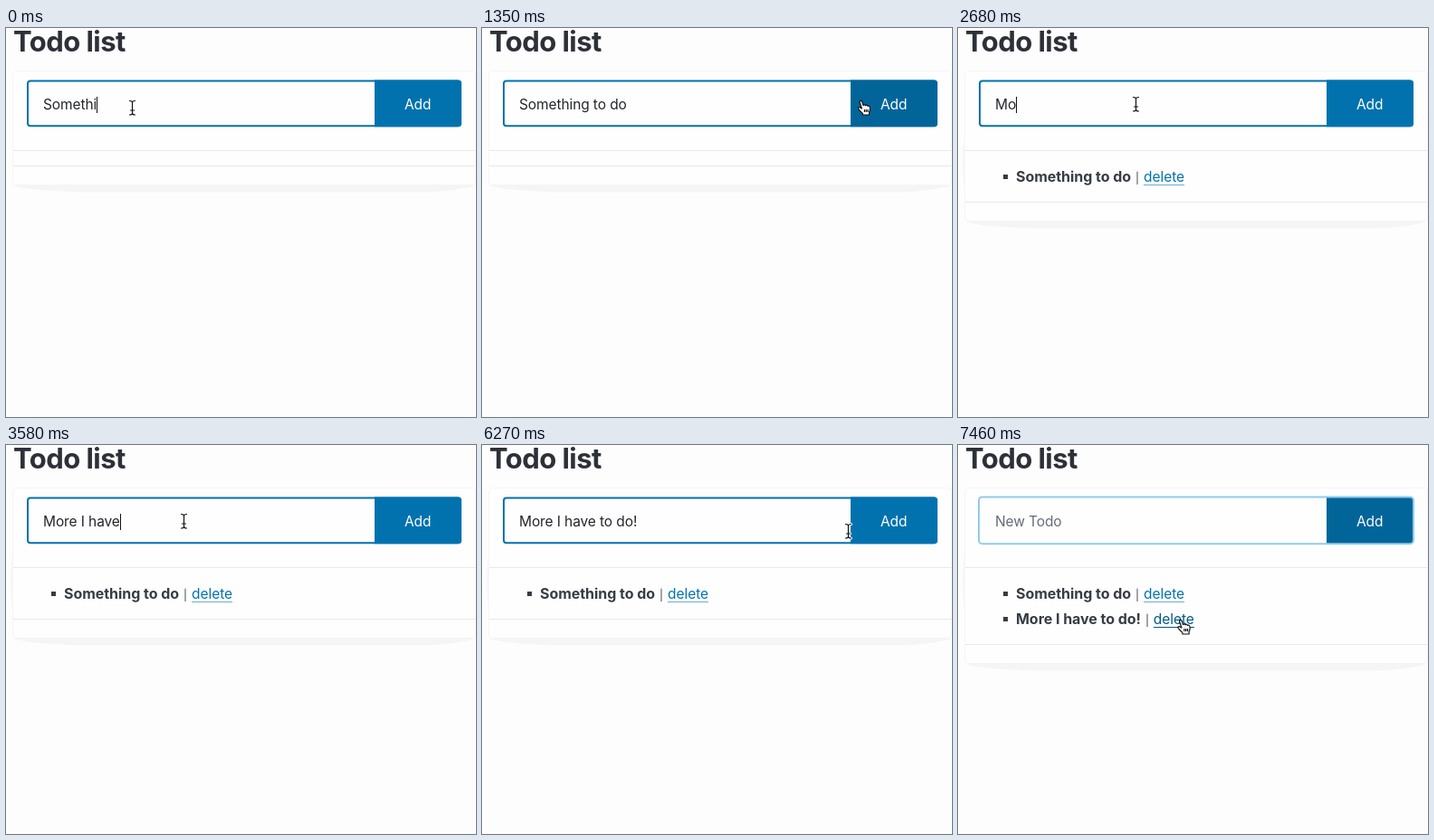
Write an HTML page that moves like this. It is 519 px wide and 430 px high and loops after 8000 ms.

```html
<!DOCTYPE html>
<html lang="en">
<head>
<meta charset="utf-8">
<title>Todo list</title>
<style>
  html, body { margin: 0; width: 100%; height: 100%; overflow: hidden; background: #fdfdfd; }
  body { position: relative; font: 15.5px/28px Inter, sans-serif; letter-spacing: -.1px; color: #373c44; }
  body * { position: absolute; box-sizing: border-box; }
  h1 { margin: 0; left: 8px; top: -3px; font: 700 31px/36px Inter, sans-serif; letter-spacing: -.55px; color: #2d3038; white-space: pre; }
  .card { left: 7px; top: 47px; width: 512px; border: 1px solid #f5f5f7; border-radius: 5px; background: #fefefe; }
  .rule { left: 8px; width: 510px; height: 1px; background: #e8e9ec; }
  svg { left: 0; top: 0; width: 519px; height: 430px; overflow: hidden; }

  .field { fill: #fefefe; stroke: #0172ad; stroke-width: 2; }
  .button { fill: #0172ad; }
  .glow { fill: none; stroke: #92cbea; stroke-width: 2; display: none; }
  .dark .button { fill: #02659a; }
  .ring .field { stroke: #fefefe; }
  .ring .glow { display: inline; }
  .line { left: 41px; top: 70.5px; height: 28px; display: flex; align-items: center; white-space: pre; color: #23262c; }
  .line * { position: static; }
  .caret { width: 1px; height: 18px; background: #111; }
  .hint { left: 41px; top: 70.5px; color: #646b79; white-space: pre; }
  .add { left: 440px; top: 70.5px; color: #fff; }

  .item { left: 64px; font-size: 16px; letter-spacing: -.04px; white-space: pre; }
  .item * { position: static; }
  .item::before { content: ""; position: absolute; left: -14px; top: 12px; width: 5px; height: 5px; background: #373c44; }
  i { font-size: 12px; font-style: normal; padding: 0 .5px; }
  u { font-size: 15.5px; color: #0172ad; text-decoration: underline 1px #6daccd; text-underline-offset: 3px; }
  u.over { color: #015887; text-decoration-color: #015887; }
</style>
</head>
<body>
<svg>
  <path id="side" fill="#f7f7fa" d="M8 120Q5 128 5 150T8 182Z"/>
  <path id="shade" fill="#f5f5f8" d="M8 0H518Q505 5 466 7.5H80Q20 5 8 0Z"/>
</svg>
<div class="card" id="card"></div>
<h1>Todo list</h1>
<svg>
  <g id="form">
    <rect class="field" x="24" y="58.4" width="478" height="49.9" rx="3"/>
    <path class="button" d="M407 57.4H499Q503 57.4 503 61.4V105.3Q503 109.3 499 109.3H407Z"/>
    <rect class="glow" x="23" y="57.4" width="480" height="51.9" rx="4"/>
  </g>
</svg>
<div class="hint" id="hint">New Todo</div>
<div class="line"><span id="value"></span><span class="caret" id="caret"></span></div>
<div class="add">Add</div>
<div class="rule" style="top:135px"></div>
<div class="rule" id="rule"></div>
<div class="item" style="top:150px"><b>Something to do</b> <i>|</i> <u>delete</u></div>
<div class="item" style="top:178px"><b>More I have to do!</b> <i>|</i> <u id="link">delete</u></div>
<svg>
  <defs>
    <path id="stem" d="M-3-8Q0-8 0-6Q0-8 3-8M0-6V5.5M-3 7.5Q0 7.5 0 5.5Q0 7.5 3 7.5M-2 2.5H2"/>
  </defs>
  <g id="beam" fill="none" stroke-linecap="round">
    <use href="#stem" stroke="#fff" stroke-width="3"/>
    <use href="#stem" stroke="#111" stroke-width="1.2"/>
  </g>
  <path id="hand" fill="#fff" stroke="#111" stroke-width="1.2" stroke-linejoin="round"
    d="M-2.6 1L-4.9-6C-5.2-7.8-3-8.2-2.4-6.6L-1-2.4C-.4-3.6 1.2-3.4 1.6-2.2C2.2-3.2 3.8-2.8 4-1.6C4.8-2.4 6.2-1.8 6.4-.4Q7.2 2.6 5.6 5.2V8H-1.6V6.4Q-4 4.4-6.2 1.6C-7.2 0-5.4-1-4.4 0ZM.4 2V5M2.2 2V5M4 2V5"/>
  <path id="arrow" fill="#111" stroke="#fff" d="M0 0V14L3.2 11 5.3 16 7.4 15 5.3 10.3H10Z"/>
</svg>
<script>
const LOOP = 8000;

const typing = [
  [0, "Somethi"], [150, "Somethin"], [300, "Something "], [450, "Something t"],
  [600, "Something to "], [750, "Something to do"], [1650, ""],
  [2680, "Mo"], [2830, "Mor"], [2980, "More "], [3130, "More I"], [3280, "More I "],
  [3430, "More I ha"], [3580, "More I have"], [3730, "More I have t"],
  [3880, "More I have to "], [4180, "More I have to do"], [4630, "More I have to do!"],
  [6720, ""]
];

const pointer = [
  [0, "beam", 139.5, 88.5], [1050, "beam", 205, 88], [1200, "beam", 345, 88],
  [1350, "hand", 422, 88], [1500, "hand", 434, 88], [1800, "beam", 335, 89],
  [1940, "beam", 222.5, 87.5], [2080, "beam", 197.5, 84.5], [2230, "beam", 196.5, 84.5],
  [5680, "beam", 206, 85], [5830, "beam", 255, 89], [5970, "beam", 325, 93],
  [6120, "beam", 380, 95], [6270, "beam", 404.5, 95.5], [6420, "hand", 425, 101],
  [6570, "hand", 434, 104], [6870, "hand", 424, 104], [7020, "arrow", 365, 140],
  [7170, "arrow", 300, 178], [7310, "hand", 256, 198], [7460, "hand", 249.5, 201]
];

const $ = id => document.getElementById(id);
const items = document.querySelectorAll(".item");
const latest = (steps, t) => steps.findLast(step => step[0] <= t);
const within = (t, ...spans) => spans.some(([from, to]) => t >= from && t < to);
const show = (el, on) => el.style.display = on ? "" : "none";

function draw(t) {
  const text = latest(typing, t)[1];
  $("value").textContent = text;
  show($("hint"), !text);
  show($("caret"), within(t, [0, 1050], [2080, 5080], [5530, 5970]));

  $("form").classList.toggle("dark", within(t, [1350, 2080], [6420, LOOP]));
  $("form").classList.toggle("ring", within(t, [1650, 2080], [6720, LOOP]));

  const count = (t >= 1650) + (t >= 6720);
  const listEnd = [152, 192, 220][count];
  items.forEach((item, i) => show(item, i < count));
  $("rule").style.top = listEnd + "px";
  $("card").style.height = listEnd - 25 + "px";
  $("shade").setAttribute("transform", `translate(0 ${listEnd + 22})`);
  show($("side"), count);
  $("link").classList.toggle("over", t >= 7310);

  const [, shape, x, y] = latest(pointer, t);
  for (const id of ["beam", "hand", "arrow"]) show($(id), id === shape);
  $(shape).setAttribute("transform", `translate(${x} ${y})`);
}

const start = performance.now();
function tick() {
  draw((performance.now() - start) % LOOP);
  requestAnimationFrame(tick);
}
tick();
</script>
</body>
</html>
```
